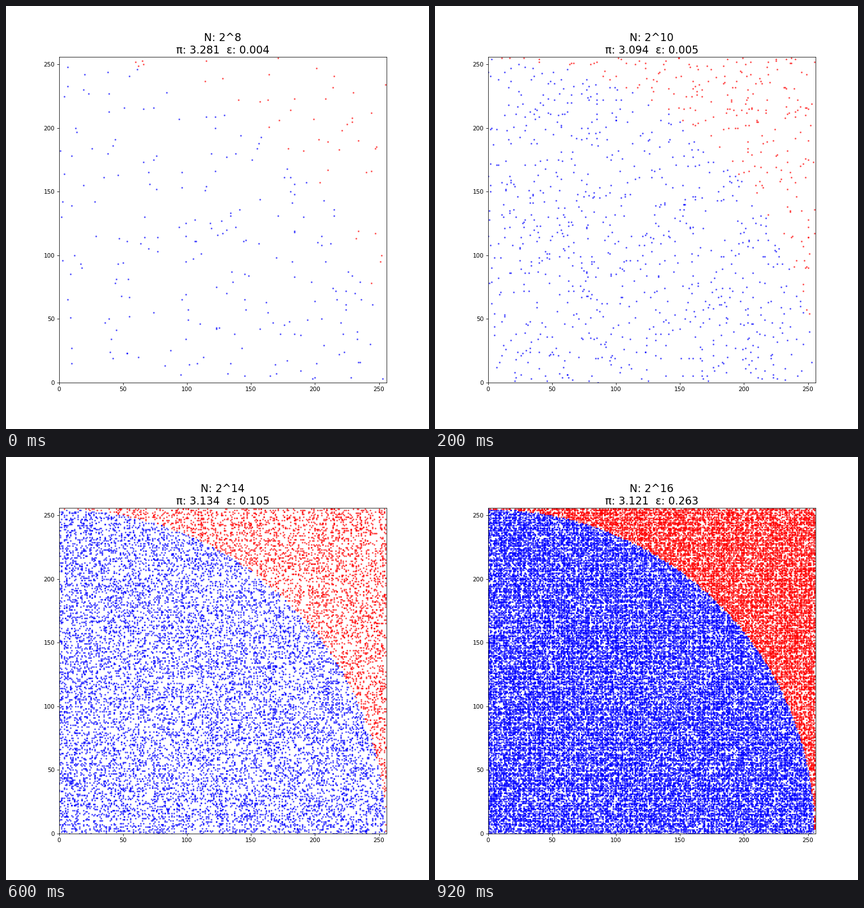
These frames come from a looping animation (748 by 748 pixels, 1 s). A matplotlib script:

```python
import matplotlib.pyplot as plt
import numpy as np
from matplotlib.animation import FuncAnimation

SIDE = 256
# exponent of the sample count, pi estimate, elapsed seconds
RUNS = [(8, 3.281, 0.004), (10, 3.094, 0.005), (12, 3.147, 0.031),
        (14, 3.134, 0.105), (16, 3.121, 0.263)]


def sample(exponent, estimate):
    """Random grid points whose inside share gives the stated estimate."""
    count = 2 ** exponent
    inside_count = round(estimate * count / 4)
    points = np.random.default_rng(exponent).integers(0, SIDE, (2 * count, 2))
    inside = (points ** 2).sum(axis=1) <= (SIDE - 1) ** 2
    return points[inside][:inside_count], points[~inside][:count - inside_count]


fig, ax = plt.subplots(figsize=(10, 10), dpi=74.8)
ax.set(xlim=(0, SIDE), ylim=(0, SIDE))
title = ax.set_title("", fontsize=18)
dots = [ax.scatter([], [], s=2.5, color=color, alpha=0.5, linewidths=1.5)
        for color in ("blue", "red")]


def draw(frame):
    exponent, estimate, seconds = RUNS[frame]
    for group, points in zip(dots, sample(exponent, estimate)):
        group.set_offsets(points)
    title.set_text(f"N: 2^{exponent}\nπ: {estimate:.3f}  ε: {seconds:.3f}")
    return [*dots, title]


anim = FuncAnimation(fig, draw, frames=len(RUNS), interval=200, repeat=True,
                     repeat_delay=0, blit=False)
plt.show()
```
